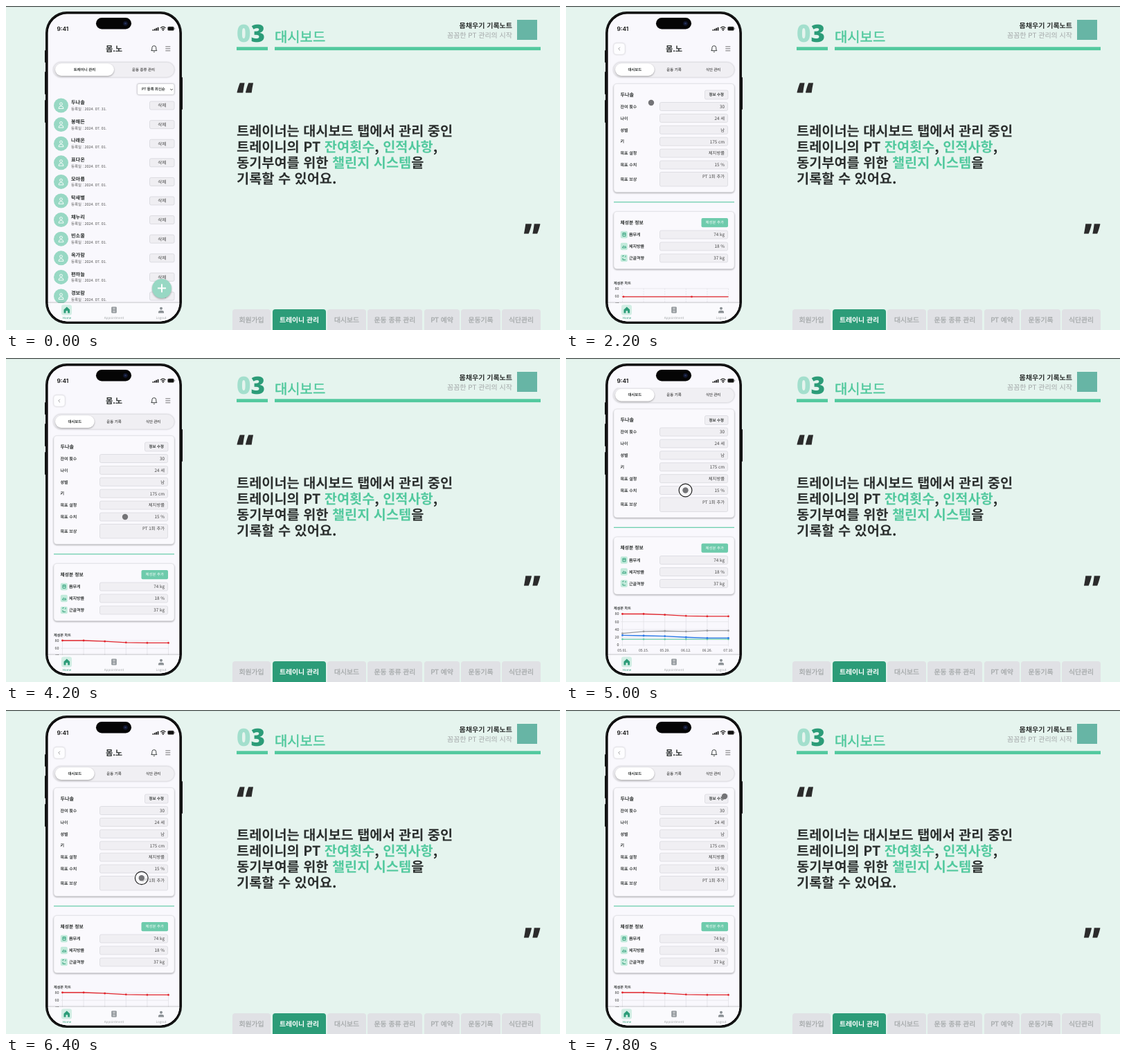
An HTML page for the animation above (8000 ms loop, 800 by 469 pixels).

```html
<!DOCTYPE html>
<html lang="ko">
<head>
<meta charset="utf-8">
<style>
html, body { margin: 0; width: 100%; height: 100%; overflow: hidden; background: #e5f4ee; }
svg { display: block; width: 100vw; height: 100vh; }
text { font-family: 'Noto Sans CJK KR', 'Noto Sans CJK', 'Noto Sans', sans-serif; text-rendering: geometricPrecision; white-space: pre; }
.card { filter: drop-shadow(0 1.2px 1px #0005); }
.soft { filter: drop-shadow(0 .6px .8px #0003); }
</style>
</head>
<body>
<svg id="stage" viewBox="0 0 800 469"></svg>
<script>
const MINT = '#52c99e', PALE = '#98d8c4', GREEN = '#2c9c78', INK = '#2b2f2e', GREY = '#a3a7a8';
const BRAND = '몸채우기 기록노트', BRAND_SHORT = '몸.노';
const members = ['두나솔', '봉해든', '나래온', '표다온', '모아름', '탁새별', '채누리', '빈소울', '옥가람', '편하늘', '경보람'];

// Markup helpers; text is centred vertically on y, and medium weight is regular with a thin outline.
const rect = (x, y, w, h, rx, fill, more = '') =>
  `<rect x="${x}" y="${y}" width="${w}" height="${h}" rx="${rx}" fill="${fill}" ${more}/>`;
const circle = (x, y, r, fill, more = '') => `<circle cx="${x}" cy="${y}" r="${r}" fill="${fill}" ${more}/>`;
const line = (d, color, width = 1, more = '') =>
  `<path d="${d}" fill="none" stroke="${color}" stroke-width="${width}" ${more}/>`;
const text = (x, y, size, str, fill = INK, weight = 400, anchor = 'start', more = '') => {
  const outline = weight === 500 ? `stroke="${fill}" stroke-width="${size * .025}"` : '';
  return `<text x="${x}" y="${y}" dy=".37em" font-size="${size}" fill="${fill}" font-weight="${weight}" text-anchor="${anchor}" ${outline} ${more}>${str}</text>`;
};
const mid = (x, y, size, str, fill, weight) => text(x, y, size, str, fill, weight, 'middle');
const field = (y, h = 12) => rect(135.5, y, 98, h, 2, '#f0eff3', 'stroke="#d6d6dc" stroke-width=".7"');
const latin = family => `style="font-family:'${family}',sans-serif"`;

function slide() {
  const tabs = [[327, 382, '회원가입'], [385, 462, '트레이니 관리'], [464, 520, '대시보드'], [522, 601, '운동 종류 관리'],
    [604, 655, 'PT 예약'], [657, 714, '운동기록'], [716, 772, '식단관리']];
  const accent = s => `<tspan fill="${MINT}">${s}</tspan>`;
  const copy = ['트레이너는 대시보드 탭에서 관리 중인', `트레이니의 PT ${accent('잔여횟수')}, ${accent('인적사항')},`,
    `동기부여를 위한 ${accent('챌린지 시스템')}을`, '기록할 수 있어요.'];
  const quote = (x, y, s, anchor) =>
    `<text x="${x}" y="${y}" font-size="50" font-weight="800" fill="#2b2b2b" text-anchor="${anchor}" ${latin('Open Sans')}>${s}</text>`;
  return rect(0, 0, 800, 469, 0, '#e5f4ee') + rect(0, 0, 800, 1.2, 0, '#3c4240')
    + text(333, 39.5, 35, '<tspan fill="#a3dfcd">0</tspan>3', GREEN, 800, 'start', latin('Open Sans'))
    + text(388, 44.3, 19.9, '대시보드', MINT, 500)
    + rect(333, 59.3, 45, 4.8, 0, MINT) + rect(388, 59.3, 384, 4.8, 0, MINT)
    + text(731, 28, 10, BRAND, INK, 700, 'end')
    + text(731, 42, 10, '꼼꼼한 PT 관리의 시작', GREY, 400, 'end')
    + rect(738, 20, 29, 29, 0, '#67b5a5')
    + quote(333, 147, '“', 'start') + quote(772, 351, '”', 'end')
    + copy.map((s, i) => text(333, 181 + i * 23, 19.72, s, INK, 700)).join('')
    + tabs.map(([a, b, s], i) => {
      const on = i === 1;
      return `<path d="M${a} 469V443q0-4 4-4H${b - 4}q4 0 4 4V469z" fill="${on ? GREEN : '#e0e1e5'}"/>`
        + mid((a + b) / 2, 454, 9.85, s, on ? '#fff' : GREY, on ? 700 : 500);
    }).join('');
}

function phoneBody() {
  const buttons = [[56, 64, 18], [56, 95, 33], [56, 136, 33], [253, 103, 47]];
  return buttons.map(([x, y, h]) => rect(x, y, 2, h, 1, '#111')).join('')
    + rect(57, 8, 197, 452, 31, '#050505')
    + rect(58.2, 9.2, 194.6, 449.6, 30, 'none', 'stroke="#4a4a4d" stroke-width=".5"')
    + rect(60.6, 11.6, 189.8, 444.8, 27.5, '#f9f8fd');
}

function statusBar() {
  const bars = [0, 1, 2, 3].map(i => rect(211.5 + i * 2.4, 34 - i * 1.1, 1.7, 1.7 + i * 1.1, .4, '#111')).join('');
  return rect(130, 17, 51, 16.5, 8.2, '#050505') + circle(172.5, 25.3, 3.4, '#11162c') + circle(172.5, 25.3, 1.3, '#29375f')
    + text(73.5, 32.5, 8.4, '9:41', '#111', 600, 'start', latin('Inter'))
    + bars + line('M223.2 31.7q3.6-3 7.2 0M224.7 33.4q2.1-1.6 4.2 0', '#111', 1.2) + circle(226.8, 35, .9, '#111')
    + rect(233.5, 30, 9, 5.4, 1.5, '#111', 'stroke="#777" stroke-width=".6"') + rect(243.4, 31.7, .8, 2, .4, '#777');
}

function navBar() {
  const list = [437.5, 440, 442.5].map(y => line(`M154 ${y}h4`, '#fff', .8)).join('');
  return rect(60, 430, 191, 28, 0, '#fafafd', 'style="filter:drop-shadow(0 -.6px .8px #0003)"')
    + rect(80, 432.5, 15, 15, 3, '#d2eee4')
    + `<path d="M83.5 439.5L87.8 435.5 92.1 439.5V444.5H89.2V441.3H86.4V444.5H83.5z" fill="${GREEN}"/>`
    + rect(152.3, 435.5, 7.4, 9, 1, '#8b9195') + list
    + circle(224, 437.7, 2, '#8b9195') + '<path d="M220 444.5v-1.4q0-2.4 4-2.4t4 2.4v1.4z" fill="#8b9195"/>'
    + mid(88, 451.5, 4.4, 'Home', GREEN) + mid(156, 451.5, 4.6, 'Appointment', GREY) + mid(224, 451.5, 4.6, 'Logout', GREY);
}

function header(labels) {
  const step = 170 / labels.length;
  return mid(156, 61.5, 11.2, BRAND_SHORT, INK, 700)
    + line('M209.8 64.6h8l-1-1.6v-2.4a3 3 0 0 0-6 0v2.4zM212.8 66.2q1 .9 2 0', INK, .9)
    + [58.8, 61.8, 64.8].map(y => line(`M230.3 ${y}h7`, '#555', .8)).join('')
    + rect(68.5, 81.5, 174.5, 21.5, 10.7, '#f0eff3', 'class="soft" stroke="#dedee3" stroke-width=".6"')
    + rect(71, 83.3, step, 17.6, 8.8, '#fff', 'class="card"')
    + labels.map((s, i) => mid(71 + step * (i + .5), 92, 5.4, s, i ? '#555' : INK, i ? 500 : 700)).join('');
}

function listScreen() {
  const row = (name, i) => {
    const y = 144 + i * 27.6;
    return circle(79.5, y, 10.5, PALE) + circle(79.5, y - 2.2, 1.9, 'none', 'stroke="#fff" stroke-width=".9"')
      + line(`M76 ${y + 4.5}q0-3.6 3.5-3.6t3.5 3.6z`, '#fff', .9)
      + text(94, y - 4.5, 7.2, name, INK, 700)
      + text(94, y + 5, 5.45, `등록일 : 2024. 07. ${i ? '01' : '31'}.`, '#555')
      + rect(207.5, y - 6, 35.5, 12, 2, '#efeef2', 'stroke="#d6d6dc" stroke-width=".8"')
      + mid(225.2, y, 6.6, '삭제', '#444');
  };
  return header(['트레이니 관리', '운동 종류 관리'])
    + rect(189.5, 112.5, 53.5, 16, 2.5, '#fff', 'class="soft" stroke="#c9c9ce" stroke-width=".7"')
    + text(196, 120.5, 5.3, 'PT 등록 최신순', INK, 500) + line('M237.2 120l1.8 1.8 1.8-1.8', '#333', .9)
    + members.map(row).join('')
    + circle(225, 409, 14, PALE, 'class="card"') + line('M219 408.5h12M225 402.5v12', '#fff', 2);
}

function dashboardScreen() {
  const profile = [['잔여 횟수', '30'], ['나이', '24 세'], ['성별', '남'], ['키', '175 cm'], ['목표 설정', '체지방률'], ['목표 수치', '15 %']];
  const body = [['몸무게', '74 kg'], ['체지방률', '18 %'], ['근골격량', '37 kg']];
  const marks = ['M82 328.6h4v4.6h-4zM82 330.4h4', 'M81.4 350l1.8-3 1.5 1.6 1-1 1 2.4z', 'M82 363v-1.5h1.5M86 361.5v2M82 365v2.5h4'];
  const value = (y, s) => text(229, y, 6.3, s, '#444', 400, 'end');
  const card = (y, h) => rect(69, y, 174, h, 4.5, '#faf9fd', 'class="card" stroke="#dedde3" stroke-width=".6"');
  return rect(69, 54, 16, 16, 4, '#fdfdff', 'class="soft" stroke="#e4e4e8" stroke-width=".5"') + line('M78 59.7l-2.3 2.3 2.3 2.3', '#888', .8)
    + header(['대시보드', '운동 기록', '식단 관리'])
    + card(112.5, 157) + text(78.5, 128, 7.1, members[0], INK, 700)
    + rect(200.5, 122, 33.5, 13, 2, '#f0eff3', 'stroke="#d6d6dc" stroke-width=".7"') + mid(217.2, 128.3, 5.4, '정보 수정', INK, 500)
    + profile.map(([k, v], i) => {
      const y = 145.5 + i * 16.9;
      return text(78.5, y, 6, k, INK, 500) + field(y - 6) + value(y, v);
    }).join('')
    + text(78.5, 250.5, 6, '목표 보상', INK, 500) + field(240.5, 20.5) + value(247, 'PT 1회 추가')
    + rect(69, 283.2, 174, 1.3, 0, '#6fcfaf')
    + card(297.5, 83) + text(78.5, 313, 6.8, '체성분 정보', INK, 700)
    + rect(195.5, 307, 38.5, 13.3, 2, '#6ecbac') + mid(214.7, 313.5, 5.4, '체성분 추가', '#fff')
    + body.map(([k, v], i) => {
      const y = 331 + i * 17;
      return rect(78.8, y - 5.2, 10, 10.4, 2, '#c2eadb') + line(marks[i], GREEN, .9)
        + text(91, y, 6, k, INK, 500) + field(y - 6) + value(y, v);
    }).join('')
    + text(69, 401, 5.1, '체성분 차트', INK, 500) + '<g id="chart"></g>';
}

const series = [['몸무게', '#e2262d', 74, [80, 80, 78, 75, 74, 74]], ['체지방률', '#2878e8', 98, [25, 24, 23, 20, 18, 18]],
  ['근골격량', '#999b9e', 127, [30, 35, 36, 35, 37, 37]], ['목표수치(체지방률)', '#68cba9', 156, [15, 15, 15, 15, 15, 15]]];
const days = ['05.01.', '05.15.', '05.29.', '06.12.', '06.26.', '07.10.'];
const chartX = i => 81.5 + i * 30.6, chartY = v => 454 - v * .5625;

// Lines start flat and settle on their values as p goes from 0 to 1.
function chart(p) {
  const grid = [0, 20, 40, 60, 80].map(v =>
    line(`M79 ${chartY(v)}H234.5`, '#dcdce1', .6) + text(76.5, chartY(v), 5.4, v, '#444', 400, 'end')).join('')
    + days.map((d, i) => line(`M${chartX(i)} 409V456`, '#dcdce1', .6, p ? '' : 'stroke-dasharray="2 1.5"')
      + mid(chartX(i), 461.5, 5.2, d, '#444')).join('');
  const plots = series.map(([name, color, x, values]) => {
    const start = name === '몸무게' ? 59 : 15;
    const points = values.map((v, i) => [chartX(i), chartY(start + (v - start) * p)]);
    const dots = p ? points : [[83, points[0][1]], [181.5, points[0][1]]];
    return line('M' + points.join('L'), color, 1.3) + dots.map(([px, py]) => circle(px, py, 1.4, color)).join('')
      + circle(x, 473.5, 1.7, color) + text(x + 3.6, 473.5, 5.2, name, '#444');
  });
  return grid + plots.reverse().join('');
}

const stage = document.getElementById('stage');
stage.innerHTML = `<clipPath id="screen"><rect x="60.6" y="11.6" width="189.8" height="444.8" rx="27.5"/></clipPath>
  <clipPath id="view"><rect x="60.6" y="43" width="189.8" height="388"/></clipPath>`
  + slide() + phoneBody()
  + `<g clip-path="url(#screen)"><g clip-path="url(#view)"><g id="list">${listScreen()}</g><g id="dashboard">${dashboardScreen()}</g></g>${navBar()}</g>`
  + statusBar()
  + `<g id="cursor">${circle(0, 0, 9.4, '#fff8', 'id="ring" stroke="#222" stroke-width="1.2"')}${circle(0, 0, 4.2, '#747477')}</g>`;
const [list, dashboard, chartBox, cursor, ring] = ['list', 'dashboard', 'chart', 'cursor', 'ring'].map(id => document.getElementById(id));

const path = [[1400, 123, 140], [3200, 123, 140], [4000, 172, 230], [4600, 172, 230], [5400, 173, 153],
  [5800, 173, 153], [6600, 200, 260], [7000, 200, 260], [7600, 229, 125], [8000, 229, 125]];
const clamp = (v, a, b) => Math.min(b, Math.max(a, v));
const show = (el, on) => el.setAttribute('visibility', on ? 'visible' : 'hidden');

function cursorAt(t) {
  const i = clamp(path.findIndex(k => k[0] > t), 1, path.length - 1);
  const [t0, x0, y0] = path[i - 1], [t1, x1, y1] = path[i];
  const u = clamp((t - t0) / (t1 - t0), 0, 1), e = u * u * (3 - 2 * u);
  return [x0 + (x1 - x0) * e, y0 + (y1 - y0) * e];
}

function draw(t) {
  const [x, y] = cursorAt(t);
  const dragging = t >= 4400 && t < 7000;
  const tapping = t >= 1600 && t < 2000;
  const scroll = dragging ? clamp(230 - y, 0, 77) : 0;
  show(list, t < 2000);
  show(dashboard, t >= 2000);
  dashboard.setAttribute('transform', `translate(0 ${-scroll})`);
  chartBox.innerHTML = chart(1 - (1 - clamp((t - 2200) / 1000, 0, 1)) ** 4);
  cursor.setAttribute('transform', `translate(${x} ${y})`);
  show(cursor, t >= 1400);
  show(ring, dragging || tapping);
}

const begin = performance.now();
function frame() {
  draw(Math.floor((performance.now() - begin) % 8000 / 200) * 200);
  requestAnimationFrame(frame);
}
frame();
</script>
</body>
</html>
```
